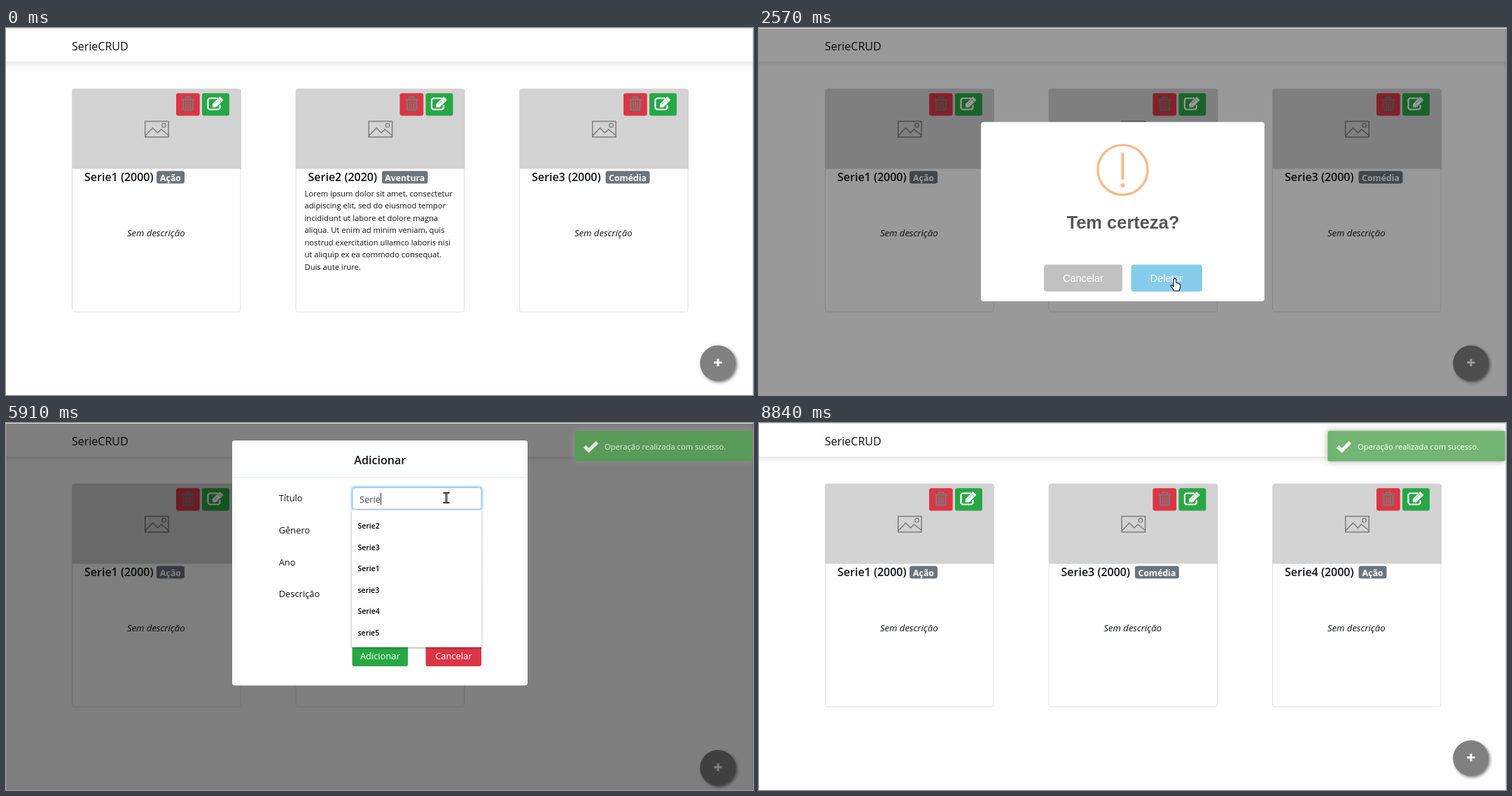
An HTML page with a canvas that plays this animation: 1067x525 px, repeating every 9070 ms.

```html
<!DOCTYPE html>
<html lang="pt">
<head>
<meta charset="utf-8">
<title>SerieCRUD</title>
<style>
html, body { margin: 0; width: 100%; height: 100%; overflow: hidden; background: #fefefe; }
canvas { display: block; }
</style>
</head>
<body>
<canvas id="stage" width="1067" height="525"></canvas>
<script>
const W = 1067, H = 525, LOOP = 9070;
const UI = '"Open Sans", "Noto Sans", sans-serif';
const ARIAL = '"Liberation Sans", Arial, sans-serif';
const RED = '#dc3545', GREEN = '#28a745', INK = '#101214';
const stage = document.getElementById('stage').getContext('2d');
const buffer = Object.assign(document.createElement('canvas'), { width: W, height: H }).getContext('2d');
let g = stage;

// timing helpers
const clamp = v => Math.max(0, Math.min(1, v));
const ramp = (t, from, len) => clamp((t - from) / len);
const mix = (a, b, p) => a + (b - a) * p;

function bezier(x1, y1, x2, y2) {
  const at = (a, b, s) => 3 * a * s * (1 - s) ** 2 + 3 * b * s * s * (1 - s) + s ** 3;
  return x => {
    if (x <= 0 || x >= 1) return clamp(x);
    let lo = 0, hi = 1;
    for (let i = 0; i < 20; i++) {
      const mid = (lo + hi) / 2;
      if (at(x1, x2, mid) < x) lo = mid; else hi = mid;
    }
    return at(y1, y2, lo);
  };
}
const ease = bezier(.25, .1, .25, 1);
const easeOut = bezier(0, 0, .58, 1);

// drawing helpers
function box(x, y, w, h, r, fill, stroke, line = 1) {
  g.beginPath();
  g.roundRect(x, y, w, h, r);
  if (fill) { g.fillStyle = fill; g.fill(); }
  if (stroke) { g.strokeStyle = stroke; g.lineWidth = line; g.stroke(); }
}

function disc(x, y, r, fill, stroke, line) {
  g.beginPath();
  g.arc(x, y, r, 0, Math.PI * 2);
  if (fill) { g.fillStyle = fill; g.fill(); }
  if (stroke) { g.strokeStyle = stroke; g.lineWidth = line; g.stroke(); }
}

function path(points, stroke, line, fill) {
  g.beginPath();
  for (let i = 0; i < points.length; i += 2) g.lineTo(points[i], points[i + 1]);
  if (fill) { g.closePath(); g.fillStyle = fill; g.fill(); }
  g.strokeStyle = stroke;
  g.lineWidth = line;
  g.stroke();
}

function text(str, x, y, size, color, style = '400', align = 'left', family = UI) {
  g.font = `${style} ${size}px ${family}`;
  g.fillStyle = color;
  g.textAlign = align;
  g.fillText(str, x, y);
}

function shadowed(color, blur, dx, dy, draw) {
  g.shadowColor = color;
  g.shadowBlur = blur;
  g.shadowOffsetX = dx;
  g.shadowOffsetY = dy;
  draw();
  g.shadowColor = 'transparent';
}

// draws a group with one common opacity
function layer(alpha, draw) {
  if (alpha <= 0) return;
  if (alpha >= 1) return draw();
  g = buffer;
  g.clearRect(0, 0, W, H);
  draw();
  g = stage;
  g.globalAlpha = alpha;
  g.drawImage(buffer.canvas, 0, 0);
  g.globalAlpha = 1;
}

function veil(alpha) {
  if (alpha <= 0) return;
  g.fillStyle = `rgba(0,0,0,${alpha})`;
  g.fillRect(0, 0, W, H);
}

// cards
const BADGE = { 'Ação': 40, 'Aventura': 65.5, 'Comédia': 63 };
const LOREM = [
  'Lorem ipsum dolor sit amet, consectetur',
  'adipiscing elit, sed do eiusmod tempor',
  'incididunt ut labore et dolore magna',
  'aliqua. Ut enim ad minim veniam, quis',
  'nostrud exercitation ullamco laboris nisi',
  'ut aliquip ex ea commodo consequat.',
  'Duis aute irure.'
];
const S1 = { name: 'Serie1 (2000)', kind: 'Ação', gap: 121 };
const S2 = { name: 'Serie2 (2020)', kind: 'Aventura', gap: 123.5, lines: LOREM };
const S3 = { name: 'Serie3 (2000)', kind: 'Comédia', gap: 123.5 };
const S4 = { name: 'Serie4 (2000)', kind: 'Ação', gap: 123.5 };

function trashIcon(x, y) {
  const c = '#7f7678';
  path([x - 9.5, y - 6, x + 9.5, y - 6], c, 2.2);
  path([x - 4, y - 6.5, x - 3, y - 9.5, x + 3, y - 9.5, x + 4, y - 6.5], c, 1.8);
  path([x - 6.8, y - 6, x - 6.4, y + 9, x + 6.4, y + 9, x + 6.8, y - 6], c, 2.4);
  for (const d of [-3, 0, 3]) path([x + d, y - 3.5, x + d, y + 7], c, 1.8);
}

function editIcon(x, y) {
  g.lineJoin = 'round';
  path([x + 4, y - 7, x - 8, y - 7, x - 10, y - 5, x - 10, y + 7, x - 8, y + 9,
    x + 5, y + 9, x + 7, y + 7, x + 7, y + 2.5], '#fff', 2.2);
  path([x - 3, y + 1.5, x + 7, y - 8.5, x + 11, y - 4.5, x + 1, y + 5.5, x - 3, y + 5.5], '#fff', 1.2, '#fff');
  path([x + 4.8, y - 6.4, x + 8.8, y - 2.4], GREEN, .9);
  path([x - .5, y + 1.8, x + 5, y - 3.7], GREEN, .7);
  g.lineJoin = 'miter';
}

function pictureIcon() {
  const c = '#777';
  g.strokeStyle = c;
  g.lineWidth = 1.4;
  g.strokeRect(104.7, 47, 33.4, 22.5);
  disc(131.5, 52.7, 2.8, null, c, 1.2);
  path([105, 67.5, 115.5, 56.5, 122.5, 63.5, 127.5, 58.5, 138, 67], c, 1.4);
}

// hover level that rises from a and falls back from b
const hover = (t, a, b) => ease(ramp(Math.min(t, b), a, 500)) * (1 - ease(ramp(t, b, 500)));

function hoverLevel(t, col) {
  if (col === 1) return Math.max(hover(t, 400, 1275), hover(t, 2760, 2960), hover(t, 7425, 7960));
  return col === 2 ? hover(t, 8020, 8340) : 0;
}

function card(serie, col, level) {
  const w = 241.5, h = 320 + 17 * level, s = 1 + .3 * level;
  g.save();
  g.translate(94 + 319.5 * col + w / 2, 86.5 + h / 2);
  g.scale(s, s);
  g.translate(-w / 2, -h / 2);
  shadowed(`rgba(0,0,0,${.55 * level})`, 8, 6 * level, 6 * level, () => box(0, 0, w, h, 3.5, '#fefefe'));
  box(.5, .5, w - 1, h - 1, 3.5, null, '#e2e2e2');
  box(.5, .5, w, 114.5, [3.5, 3.5, 0, 0], '#d3d3d3');
  pictureIcon();
  box(149, 6.7, 33.7, 32.3, 3, RED);
  trashIcon(166, 22);
  box(186, 6.7, 39, 32.3, 3, GREEN);
  editIcon(204.5, 21);
  text(serie.name, 18, 132.3, 16, INK, '600');
  box(serie.gap, 118, BADGE[serie.kind], 18, 3.5, '#6c757d');
  text(serie.kind, serie.gap + BADGE[serie.kind] / 2, 132, 12.3, '#fff', '700', 'center');
  if (serie.lines) serie.lines.forEach((line, i) => text(line, 13, 154.3 + 17.5 * i, 11.2, INK));
  else text('Sem descrição', w / 2 - .5, 211, 13.1, INK, 'italic 400', 'center');
  g.restore();
}

function page(t, plusY) {
  g.fillStyle = '#fefefe';
  g.fillRect(0, 0, W, H);
  shadowed('rgba(0,0,0,.13)', 9, 0, 2, () => box(-10, -10, W + 20, 58, 0, '#fefefe'));
  text('SerieCRUD', 94, 31.7, 16, INK);
  const list = t < 2700 ? [S1, S2, S3] : t < 7300 ? [S1, S3] : [S1, S3, S4];
  list.forEach((serie, col) => card(serie, col, hoverLevel(t, col)));
  shadowed('rgba(0,0,0,.5)', 4, 2, 2, () => disc(1016.8, plusY, 25.5, '#808080'));
  g.fillStyle = '#fff';
  g.fillRect(1011.5, plusY - 2.5, 11, 3);
  g.fillRect(1015.5, plusY - 6.5, 3, 11);
  g.fillStyle = '#dedede';
  g.fillRect(W - 1, 0, 1, H);
}

// confirmation dialog
function popScale(u) {
  if (u < .45) return mix(.7, 1.05, ease(u / .45));
  if (u < .8) return mix(1.05, .95, ease((u - .45) / .35));
  return mix(.95, 1, ease((u - .8) / .2));
}

function confirmBox(scale, cy, hot) {
  g.save();
  g.translate(519.5, cy);
  g.scale(scale, scale);
  box(-202.5, -128.5, 405, 256.5, 4, '#fff');
  disc(0, -60, 35.6, null, '#f8bb86', 3.4);
  box(-2, -85, 4, 39, 2, '#f8bb86');
  disc(0, -38, 3.1, '#f8bb86');
  text('Tem certeza?', .5, 24, 25.5, '#575757', '700', 'center', ARIAL);
  box(-112.5, 75.5, 112, 38.5, 4, '#c1c1c1');
  box(12, 75.5, 101.5, 38.5, 4, hot ? '#86cceb' : '#8cd4f5');
  text('Cancelar', -56.5, 100, 14.45, '#fff', '400', 'center', ARIAL);
  text('Deletar', 62.5, 100, 14.45, '#fff', '400', 'center', ARIAL);
  g.restore();
}

function confirmation(t) {
  if (t < 1243 || t > 2860) return;
  veil(.4 * ramp(t, 1290, 160) * (1 - ramp(t, 2600, 250)));
  const scale = popScale(ramp(t, 1243, 300)) * mix(1, .5, ease(ramp(t, 2590, 180)));
  layer(ramp(t, 1243, 60) * (1 - ramp(t, 2590, 160)), () => confirmBox(scale, t < 2570 ? 270 : 263, t > 1880));
}

// form dialog
const KEYS = [[5200, 'S'], [5500, 'e'], [5670, 'r'], [5820, 'i'], [5900, 'e'], [6440, '4']];
const HINTS = ['Serie2', 'Serie3', 'Serie1', 'serie3', 'Serie4', 'serie5'];

function field(y, h, focus) {
  if (focus) box(493.5, y - 1, 187, h + 2, 4.5, null, '#bfdeff', 2.4);
  box(495, y + .5, 184, h - 1, 3.5, '#fefefe', focus ? '#80bdff' : '#dadee3');
}

function form(t) {
  const gray = '#3c4349';
  box(323, 25, 422, 350.5, 4, '#fefefe');
  text('Adicionar', 534.3, 58.8, 16.1, INK, '600', 'center');
  g.fillStyle = '#e4e7ea';
  g.fillRect(323, 77.5, 422, 1);
  ['Título', 'Gênero', 'Ano', 'Descrição'].forEach((label, i) => text(label, 389.7, 112.3 + 45.7 * i, 12.9, INK));
  const focus = t >= 4650;
  field(92, 32, focus);
  field(138, 32);
  field(183, 33);
  field(229, 73);
  text('Ação', 508.5, 159.8, 12.9, gray);
  path([667.7, 152, 671.2, 155.5, 674.7, 152], '#333', 1.2);
  text('2000', 505, 205.6, 12.9, gray);
  path([670.5, 300, 677.5, 293], '#888', 1);
  path([674.5, 300, 677.5, 297], '#888', 1);
  box(494.5, 316, 79.5, 32, 3, GREEN);
  box(599.5, 316, 79.5, 32, 3, RED);
  text('Adicionar', 534.3, 337.6, 12.9, '#fff', '400', 'center');
  text('Cancelar', 639.3, 337.6, 12.9, '#fff', '400', 'center');
  if (!focus) return;

  const typed = KEYS.filter(k => t >= k[0]).map(k => k[1]).join('');
  text(typed, 505, 114, 12.9, gray);
  g.fillStyle = '#333';
  g.fillRect(Math.round(505 + g.measureText(typed).width), 100, 1, 17);
  if (t >= 4715 && t < 6520) {
    const hints = t < 6440 ? HINTS : ['Serie4'];
    shadowed('rgba(0,0,0,.4)', 3, 0, 1, () => box(493.7, 124.3, 185.8, 13.5 + 30.5 * hints.length, 1.5, '#fefefe'));
    hints.forEach((hint, i) => text(hint, 502.5, 151 + 30.5 * i, 10.5, '#000', '600'));
  }
}

function formDialog(t) {
  if (t < 3600 || t > 7480) return;
  veil(.5 * ramp(t, 3600, 150) * (1 - ramp(t, 7330, 150)));
  const drop = easeOut(ramp(t, 3600, 200)) - easeOut(ramp(t, 7250, 250));
  layer(ramp(t, 3600, 150) * (1 - ramp(t, 7250, 170)), () => {
    g.save();
    g.translate(0, -43 * (1 - drop));
    form(t);
    g.restore();
  });
}

// notices
function notice(y, alpha) {
  layer(alpha, () => {
    shadowed('#999', 10, 0, 0, () => box(812.3, y, 253.5, 43.5, 2.5, '#51a351'));
    path([826.5, y + 22.3, 832.5, y + 28, 844.5, y + 16.3], '#fff', 5);
    text('Operação realizada com sucesso.', 855, y + 26.3, 11.2, '#fff');
  });
}

function notices(t) {
  if (t < 7760) notice(11.3, .8 * ramp(t, 2700, 300) * (1 - ramp(t, 7600, 220)));
  notice(t < 7760 ? 61 : 11.3, .8 * ramp(t, 7300, 300));
}

// pointer
const POINTER = {
  arrow: () => path([0, 0, 0, 13.8, 3.2, 10.9, 5.4, 15.8, 7.6, 14.8, 5.5, 10.1, 9.8, 10.1, 0, 0], '#111', 1, '#fff'),
  hand: () => path([-1.8, 1.3, 0, 0, 1.8, 1.3, 1.8, 6.5, 5, 7.3, 7.8, 9, 7.8, 13, 6.3, 18, -1, 18,
    -3, 15, -5.8, 11, -4.5, 9.8, -1.8, 12, -1.8, 1.3], '#111', 1.1, '#fff'),
  beam: () => {
    for (const y of [-7, 7]) path([-4.5, y, 4.5, y], '#333', 2.2);
    path([0, -7, 0, 7], '#333', 3);
    path([0, -6.5, 0, 6.5], '#aaa', 1);
  }
};
const ROUTE = [
  [70, 992, 508, 'arrow'], [400, 648, 290, 'arrow'], [900, 592, 75, 'hand'], [1240, 594, 68, 'arrow'],
  [1420, 594, 68, 'arrow'], [1880, 594, 345, 'hand'], [2190, 594, 358, 'hand'], [2680, 594, 358, 'arrow'],
  [3420, 1020, 480, 'hand'], [3490, 1029, 483, 'hand'], [3640, 1023.5, 486, 'arrow'], [3880, 1023.5, 486, 'arrow'],
  [4450, 629, 115, 'beam'], [4890, 629, 115, 'beam'], [4950, 629, 107, 'beam'], [6880, 629, 107, 'arrow'],
  [7120, 546, 325, 'hand'], [7260, 546, 325, 'arrow'], [7800, 546, 325, 'arrow'], [8020, 735, 345, 'arrow'],
  [8340, 1005, 440, 'arrow'], [8600, 1020, 482, 'hand'], [8700, 1024, 506, 'arrow'], [8840, 1030, 530, 'arrow']
];

function pointer(t) {
  const i = ROUTE.findIndex(k => k[0] > t);
  if (i < 1) return;
  const [t0, x0, y0, shape] = ROUTE[i - 1], [t1, x1, y1] = ROUTE[i];
  const p = (t - t0) / (t1 - t0);
  g.save();
  g.translate(mix(x0, x1, p), mix(y0, y1, p));
  POINTER[shape]();
  g.restore();
}

function draw(t) {
  // the view is taller while a dialog locks scrolling
  const locked = (t >= 1243 && t < 2570) || (t >= 3600 && t < 7480);
  page(t, locked ? 493.3 : 479.5);
  confirmation(t);
  formDialog(t);
  notices(t);
  g.fillStyle = '#dedede';
  g.fillRect(0, 0, W, 1);
  pointer(t);
}

const start = performance.now();
function tick() {
  draw((performance.now() - start) % LOOP);
  requestAnimationFrame(tick);
}
tick();
</script>
</body>
</html>
```
